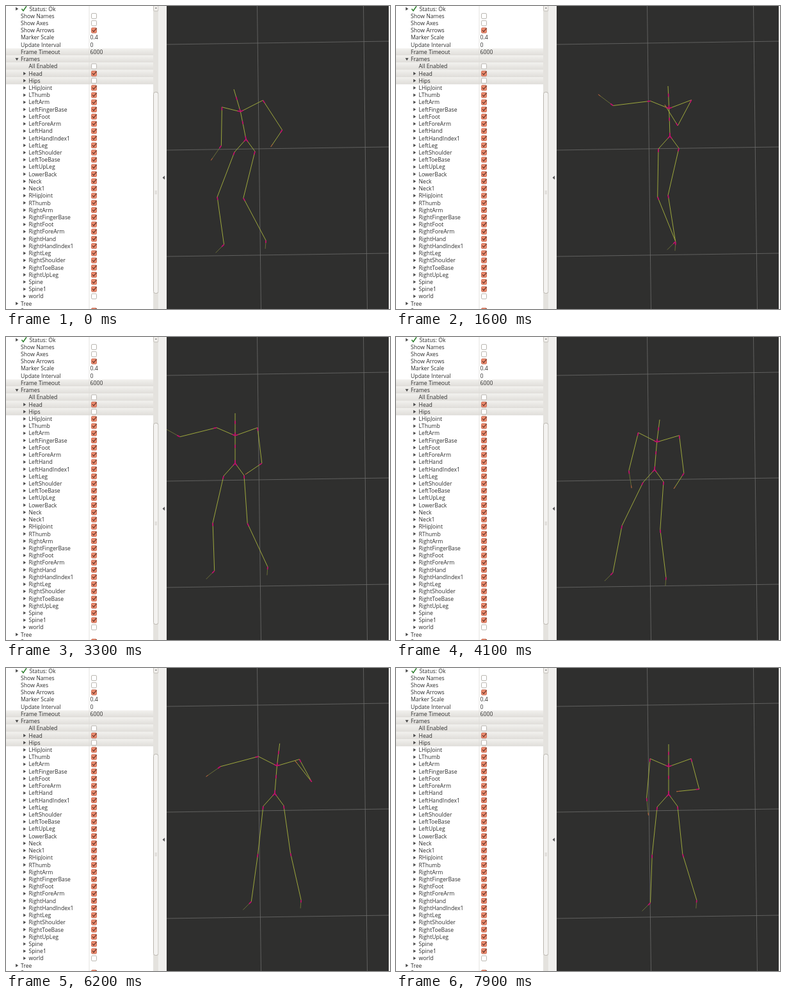
Animation, 600 px wide and 473 px high, one loop 8 s. Source, as an HTML page:

```html
<!DOCTYPE html>
<html lang="en">
<head>
<meta charset="utf-8">
<title>Skeleton viewer</title>
<style>
  html, body { margin: 0; width: 100%; height: 100%; overflow: hidden; background: #fff; }
  svg { display: block; width: 600px; height: 473px; }
  text { font: 500 8.7px "Open Sans", "Noto Sans", sans-serif; fill: #2e2e2e; white-space: pre; }
  path { fill: none; }
</style>
</head>
<body>
<svg viewBox="0 0 600 473">
  <defs>
    <linearGradient id="shade" x2="0" y2="1">
      <stop stop-color="#f2f1ee"/><stop offset="1" stop-color="#dfddd9"/>
    </linearGradient>
    <clipPath id="view"><rect x="251" width="347" height="473"/></clipPath>
  </defs>
  <rect width="600" height="473" fill="#fff"/>
  <g id="panel"></g>
  <rect x="230" width="8.5" height="473" fill="#e4e2de"/>
  <rect x="230.5" y="-3" width="7.5" height="11" rx="2" fill="#f0eeeb" stroke="#c4c0ba"/>
  <path d="M232.8 4l1.5-2 1.5 2z" style="fill:#777"/>
  <rect x="230.5" y="134.5" width="7.5" height="314" rx="3" fill="#f4f3f1" stroke="#bab6af"/>
  <path d="M232.5 289h3.5m-3.5 2h3.5m-3.5 2h3.5" stroke="#c5c1bb" stroke-width=".8"/>
  <rect x="238.5" width="12.5" height="473" fill="#f0efed"/>
  <path d="M248 265v6l-3.5-3z" style="fill:#555"/>
  <g clip-path="url(#view)">
    <rect x="251" width="347" height="473" fill="#2f2f2e"/>
    <path d="M392.5 0l6 473M558.5 0l6 473M251 60l347-5M251 225l347-5M251 391l347-5" stroke="#6c6c6b" stroke-width=".8"/>
    <path id="dim" stroke="#70743a" stroke-width=".9"/>
    <path id="bones" stroke="#a3ad3e" stroke-width=".95"/>
    <path id="heads" stroke="#c10c6c" stroke-width="1.7"/>
    <path id="tips" stroke="#b8583a"/>
  </g>
  <rect x="598" width="2" height="473" fill="#f0efed"/>
</svg>
<script>
const $ = id => document.getElementById(id);

// Property tree
const PITCH = 11.22;
const frameNames = ('Head Hips LHipJoint LThumb LeftArm LeftFingerBase LeftFoot LeftForeArm LeftHand ' +
  'LeftHandIndex1 LeftLeg LeftShoulder LeftToeBase LeftUpLeg LowerBack Neck Neck1 RHipJoint RThumb ' +
  'RightArm RightFingerBase RightFoot RightForeArm RightHand RightHandIndex1 RightLeg RightShoulder ' +
  'RightToeBase RightUpLeg Spine Spine1 world').split(' ');
const rows = [
  { name: 'Status: Ok', x: 36.5, arrow: 17, ok: true },
  { name: 'Show Names', check: false },
  { name: 'Show Axes', check: false },
  { name: 'Show Arrows', check: true },
  { name: 'Marker Scale', value: '0.4' },
  { name: 'Update Interval', value: '0' },
  { name: 'Frame Timeout', value: '6000' },
  { name: 'Frames', arrow: 17, open: true },
  { name: 'All Enabled', x: 35.5, check: false },
  ...frameNames.map(name => ({ name, x: 35.5, arrow: 29, check: name !== 'Hips' && name !== 'world' })),
  { name: 'Tree', arrow: 17 },
  { name: 'Segment', check: true }
];

function drawRow({ name, x = 23, arrow, open, ok, value, check }, i) {
  const y = 4.4 + i * PITCH;
  const label = (x, text) => `<text x="${x}" y="${y + 3.2}">${text}</text>`;
  let out = '';
  if (i > 5 && i < 11) out += `<rect y="${y - 5.6}" width="230" height="${PITCH}" fill="url(#shade)"/>`;
  if (arrow) {
    const shape = open ? 'm-2.5 -1.8h5l-2.5 4z' : 'm-1.8 -2.6v5.2l4 -2.6z';
    out += `<path d="M${arrow} ${y}${shape}" style="fill:#4a4a4a"/>`;
  }
  if (ok) out += `<path d="M24.5 ${y}l2.5 3 5-7" stroke="#2c7d2c" stroke-width="1.6"/>`;
  out += label(x, name);
  if (value) out += label(131.5, value);
  if (check !== undefined) {
    out += `<rect x="133.5" y="${y - 4}" width="8" height="8" rx="1.5" ` +
      (check ? 'fill="#ee8b6e" stroke="#c8705a"/>' : 'fill="#fff" stroke="#b9b5af"/>');
    if (check) out += `<path d="M135 ${y - .5}l2 2.5 4.5-5.5" stroke="#63372b" stroke-width="1.2"/>`;
  }
  return out;
}
$('panel').innerHTML = rows.map(drawRow).join('') +
  '<path d="M130 0v473" stroke="#dedcd8" stroke-width=".8"/>';

// Key poses: pelvis, sideways lean, and [upper, lower] limb angles in degrees from straight down
const poses = [];
const pose = (time, x, y, lean, ...angles) => poses.push({ time, values: [x, y, lean, ...angles.flat()] });
//         pelvis     lean  left arm      right arm    left leg    right leg
pose(0,    375, 208, -19, [-1, -35],   [33, -34],   [-21, 8],   [-14, 28]);
pose(1600, 428, 203, -3,  [-83, -127], [-28, -148], [-1, 22],   [-13, 9]);
pose(3300, 358, 197, 0,   [-76, -119], [7, -56],    [-13, 2],   [4, 25]);
pose(4100, 404, 207, 8,   [-14, 9],    [7, -33],    [-26, -11], [-4, 7]);
pose(5400, 421, 198, 10,  [-18, 62],   [10, -156],  [-8, -9],   [7, 4]);
pose(6900, 419, 194, 6,   [-77, -151], [-1, -130],  [-5, -7],   [9, 20]);
pose(7900, 426, 197, 0,   [-5, 6],     [15, -84],   [-6, -2],   [6, 17]);

const RAD = Math.PI / 180;
const shift = ([x, y], dx, dy) => [x + dx, y + dy];
const along = (p, angle, length) => shift(p, Math.sin(angle * RAD) * length, Math.cos(angle * RAD) * length);
const mix = (p, q, k) => p.map((v, i) => v + (q[i] - v) * k);

// Folded arms point at the viewer: the upper arm looks shorter, the forearm longer
function arm(shoulder, upper, lower) {
  const fold = (1 - Math.cos((lower - upper) * RAD)) / 2;
  const elbow = along(shoulder, upper, 62 - 22 * fold);
  return [shoulder, elbow, along(elbow, lower, 27 + 15 * fold)];
}

function leg(hip, upper, lower, toeOut) {
  const knee = along(hip, upper, 75), ankle = along(knee, lower, 75);
  return [hip, knee, ankle, shift(ankle, toeOut, 13)];
}

function skeletonAt(t) {
  const next = Math.max(1, poses.findIndex(p => p.time >= t));
  const a = poses[next - 1], b = poses[next];
  const u = (t - a.time) / (b.time - a.time);
  const [x, y, lean, la, lf, ra, rf, lt, ls, rt, rs] = mix(a.values, b.values, u * u * (3 - 2 * u));
  const open = 25 * Math.sin(Math.PI * u) ** 2; // arms swing outwards between poses
  const pelvis = [x, y], tilt = lean * .28;
  const chest = shift(pelvis, lean * .45, -43), head = shift(pelvis, lean, -78);
  return {
    spine: [pelvis, mix(pelvis, chest, .55), chest, mix(chest, head, .52), head],
    arms: [arm(shift(chest, -29, -12.5 - tilt), la - open, lf), arm(shift(chest, 35, -12.5 + tilt), ra + open, rf)],
    legs: [leg(shift(pelvis, -18, 20), lt, ls, -13), leg(shift(pelvis, 14, 19), rt, rs, -1)]
  };
}

const line = (p, q) => `M${p.map(v => v.toFixed(1))}L${q.map(v => v.toFixed(1))}`;

function draw(t) {
  const { spine, arms, legs } = skeletonAt(t);
  const d = { dim: '', bones: '', heads: '', tips: '' };
  const chain = (points, dimEnd) => points.slice(1).forEach((child, i) => {
    const parent = points[i];
    const length = Math.hypot(child[0] - parent[0], child[1] - parent[1]);
    d[dimEnd && i === points.length - 2 ? 'dim' : 'bones'] += line(parent, child);
    d.heads += line(parent, mix(parent, child, Math.min(.3, 5 / length)));
  });
  chain(spine);
  arms.forEach((points, right) => {
    const [, elbow, hand] = points;
    chain([spine[2], ...points], !right);
    d.tips += line(mix(elbow, hand, .85), hand);
  });
  legs.forEach(points => chain([spine[0], ...points], true));
  for (const id in d) $(id).setAttribute('d', d[id]);
}

const start = performance.now();
function tick() {
  const t = (performance.now() - start) % 8000;
  draw(Math.floor(t / 100) * 100);
  requestAnimationFrame(tick);
}
tick();
</script>
</body>
</html>
```
